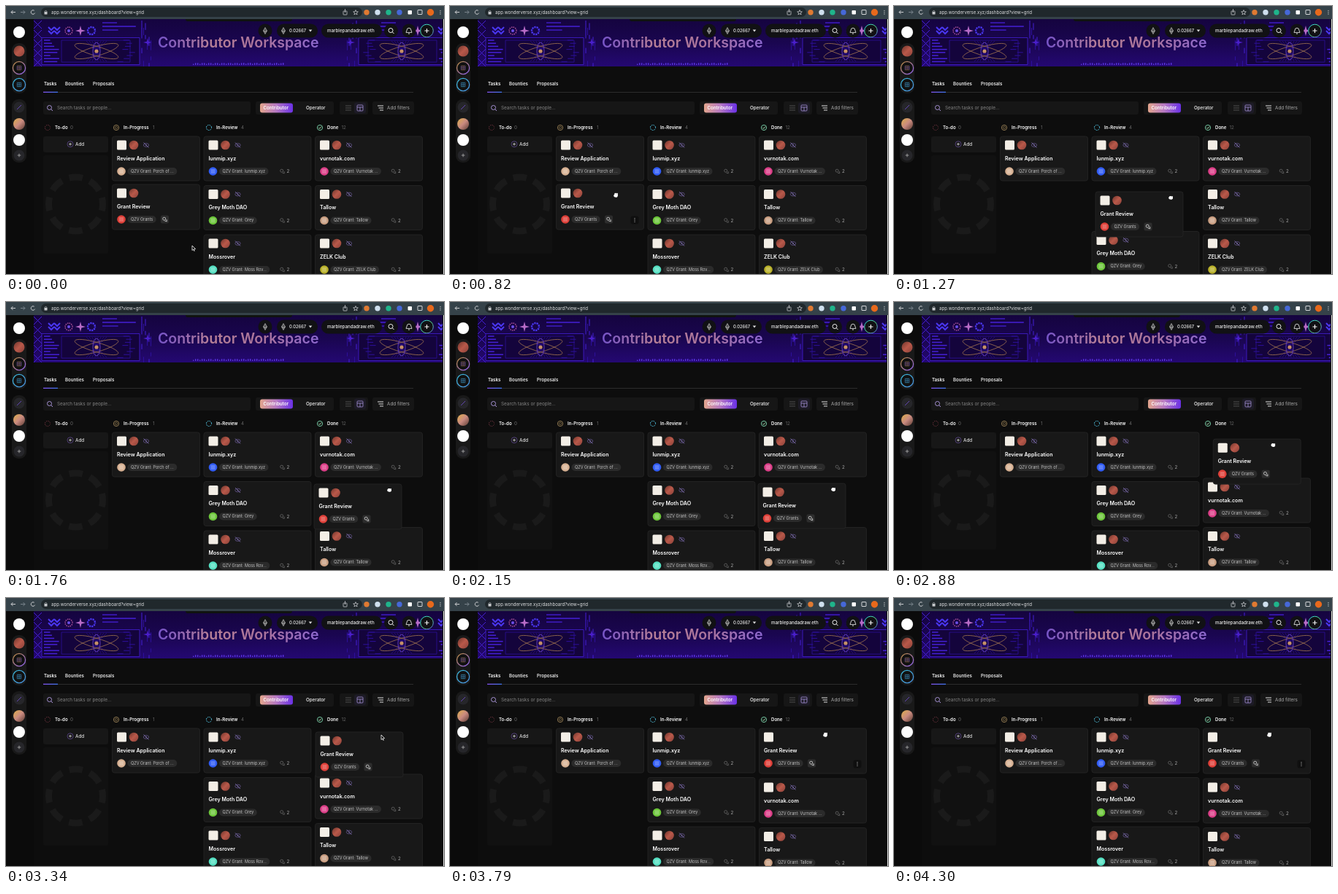
An HTML page with a canvas that plays this animation: 600x368 px, repeating every 4330 ms.

```html
<!DOCTYPE html>
<html lang="en">
<head>
<meta charset="utf-8">
<title>Contributor Workspace</title>
<style>
html, body { margin: 0; width: 100%; height: 100%; overflow: hidden; background: #0d0d0d; }
canvas { display: block; }
</style>
</head>
<body>
<canvas id="stage" width="600" height="368"></canvas>
<script>
const c = document.getElementById('stage').getContext('2d');
const LOOP = 4330, GRAB = 900, RELEASE = 3250, SETTLE = 3450, HOVER = 3600;
const TAU = Math.PI * 2, TOP = 179, PITCH = 67.5, WIDE = 147, NARROW = 120;
const VIOLET = '#4520d6', DIM = '#2d109b';

const rand = i => { const v = Math.sin(i * 12.9898) * 43758.5453; return v - Math.floor(v); };

function paint(fill, stroke, width = 0.8) {
  if (fill) { c.fillStyle = fill; c.fill(); }
  if (stroke) { c.strokeStyle = stroke; c.lineWidth = width; c.stroke(); }
}
function box(x, y, w, h, r, fill, stroke) {
  c.beginPath();
  c.roundRect(x, y, w, h, r);
  paint(fill, stroke);
}
function oval(x, y, rx, ry, fill, stroke, width, tilt = 0) {
  c.beginPath();
  c.ellipse(x, y, rx, ry, tilt, 0, TAU);
  paint(fill, stroke, width);
}
const dot = (x, y, r, fill) => oval(x, y, r, r, fill);
function ring(x, y, r, color, width = 1, dash = []) {
  c.setLineDash(dash);
  c.lineDashOffset = dash.length ? dash[0] / 2 : 0;
  oval(x, y, r, r, null, color, width);
  c.setLineDash([]);
}
// Polyline from a flat list of coordinates, relative to (x, y).
function line(x, y, pts, color, width = 1, fill) {
  c.beginPath();
  for (let i = 0; i < pts.length; i += 2) c.lineTo(x + pts[i], y + pts[i + 1]);
  paint(fill, color, width);
}
const across = (x, y, w, color, width) => line(x, y, [0, 0, w, 0], color, width);
const upright = (x, y, h, color, width) => line(x, y, [0, 0, 0, h], color, width);
const chevron = (x, y, dx, dy, color, width) => line(x, y, [-dx, -dy, 0, 0, dx, -dy], color, width);

function star(x, y, n, outer, inner, fill, stroke) {
  c.beginPath();
  for (let i = 0; i < 2 * n; i++) {
    const r = i % 2 ? inner : outer, a = i * Math.PI / n;
    c.lineTo(x + r * Math.sin(a), y - r * Math.cos(a));
  }
  c.closePath();
  paint(fill, stroke);
}
function text(s, x, y, size, color, weight = 400) {
  c.font = `${weight} ${size}px Inter, sans-serif`;
  c.textBaseline = 'middle';
  c.fillStyle = color;
  c.fillText(s, x, y);
}
function blend(x0, y0, x1, y1, ...colors) {
  const g = c.createLinearGradient(x0, y0, x1, y1);
  colors.forEach((k, i) => g.addColorStop(i / (colors.length - 1), k));
  return g;
}
const around = (x, y, r, ...colors) => blend(x - r, y - r, x + r, y + r, ...colors);

function plus(x, y, r, color) {
  across(x - r, y, 2 * r, color);
  upright(x, y - r, 2 * r, color);
}
function lens(x, y, color) {
  ring(x - 0.5, y - 0.5, 3, color);
  line(x, y, [1.8, 1.8, 4, 4], color);
}
function dots(x, y, color) {
  for (const d of [-2.3, 0, 2.3]) dot(x, y + d, 0.65, color);
}
const portrait = (x, y, r) => dot(x, y, r, around(x, y, r, '#6f352c', '#b9594a', '#8a4139'));

function smooth(t, start, span) {
  const p = Math.min(1, Math.max(0, (t - start) / span));
  return p * p * (3 - 2 * p);
}

function browserBar() {
  const pale = '#c8cacd';
  box(0, 0, 600, 18, 0, '#354249');
  box(48, 2, 440, 13, 6.5, '#20282c');
  for (const [x, dir, color] of [[10, 1, pale], [23, -1, '#77828a']]) {
    across(x - 3, 8.5, 6, color);
    line(x - 3 * dir, 8.5, [2.5 * dir, -2.5, 0, 0, 2.5 * dir, 2.5], color);
  }
  c.beginPath();
  c.arc(37, 8.5, 2.8, 0.4, 5.4);
  paint(null, pale, 1);
  box(52.5, 8, 4, 3.5, 0.5, pale);
  ring(54.5, 7.8, 1.4, pale, 0.7);
  text('app.wonderverse.xyz/dashboard?view=grid', 62, 8.7, 6.1, '#e0e1e3');
  box(462, 7, 5, 5, 0.5, null, pale);
  upright(464.5, 4, 5, pale, 0.8);
  star(479, 9, 5, 3.5, 1.5, null, pale);
  ['#e07a32', '#cfe0ef', '#1fb58b', '#4668d8'].forEach((k, i) => dot(494 + 15 * i, 8.7, 3.7, k));
  box(550.5, 6, 5.5, 5.5, 1, '#fff');
  box(564, 5.5, 6, 6, 0.5, null, '#fff');
  dot(581.5, 8.7, 4.7, '#e8691c');
  dots(595, 8.7, pale);
}

function ornament() {
  for (let i = 0; i < 5; i++) {
    line(38, 20 + 13 * i, [0, 0, 11, 11], VIOLET);
    line(38, 31 + 13 * i, [0, 0, 11, -11], VIOLET);
  }
  for (let i = 0; i < 4; i++) chevron(62 + 8 * (i % 2), 33 + 5 * (i >> 1), 4, 4, '#4a37f0', 2);
  ring(86, 34, 5, '#b5569c', 1.4, [1.5, 1.2]);
  dot(86, 34, 2, '#6b4ee8');
  star(102, 34, 4, 7, 2, '#b86cc8');
  ring(117, 34, 5, '#4a37f0', 2.4, [2.2, 1]);
  star(194, 50, 4, 6, 1.6, '#4b1fc9');

  for (let i = 0; i < 3; i++) across(132, 23 + 5 * i, 20 + 28 * rand(i), VIOLET, 1.3);
  box(49, 43.5, 134, 37, 0, '#14043c', VIOLET);
  box(76, 47, 94, 30, 0, null, DIM);
  for (let i = 0; i < 8; i++) {
    const y = 47 + i * 4.2;
    across(52, y, 6 + 15 * rand(i + 7), VIOLET, 1.5);
    across(172 - 20 * rand(i + 3), y, 8, DIM);
    line(124, 62, [(i - 3.5) * 4, -14, (3.5 - i) * 4, 14], DIM, 0.6);
  }
  for (let i = 0; i < 14; i++) upright(186 + 2.5 * (i % 6), 20 + 60 * rand(i), 4 + 12 * rand(i + 40), i % 2 ? DIM : VIOLET);
  for (const tilt of [-0.28, 0.28]) oval(124, 62, 31, 6.5, null, '#94694f', 0.9, tilt);
  oval(124, 62, 5, 12, null, '#6a43c8', 0.9);
  dot(124, 62, 2.6, '#c59067');
}

function banner() {
  c.save();
  c.beginPath();
  c.rect(38, 18, 560, 65);
  c.clip();
  c.fillStyle = blend(0, 18, 0, 83, '#15043f', '#1a0650', '#240872');
  c.fillRect(38, 18, 560, 65);
  ornament();
  c.save();
  c.translate(666, 0);
  c.scale(-1, 1);
  ornament();
  c.restore();
  for (let i = 0; i < 42; i++) {
    const h = 1.5 + 1.5 * Math.abs(Math.sin(i * 2.1));
    box(256 + 3 * i, 81 - h, 1.4, h, 0, '#5a33e0');
  }
  box(246, 14, 146, 7, 3, '#101310');
  c.restore();
  text('Contributor Workspace', 208, 51.2, 19.5, blend(208, 0, 428, 0, '#7654c9', '#b67f96', '#a9739d', '#8d68cf'), 600);

  const black = '#111114', mid = 34;
  box(371, 24.5, 56, 19, 9.5, black);
  box(432, 24.5, 83, 19, 9.5, black);
  for (const x of [355, 527.5, 552, 576.5]) dot(x, mid, 9.5, black);
  for (const x of [355, 380]) {
    star(x, mid, 2, 4.5, 2.5, '#555', '#aaa');
    chevron(x, mid + 1.5, 2.5, 1.5, '#ddd', 0.6);
  }
  text('0.02667', 388, mid, 5.8, '#eee', 500);
  line(417, 33.5, [-2.3, -1, 2.3, -1, 0, 2], null, 0, '#ddd');
  text('marblepandadraw.eth', 440, mid, 6.2, '#eee', 500);
  lens(527.5, mid, '#eee');
  c.beginPath();
  c.arc(552, mid - 1, 2.8, Math.PI, TAU);
  c.lineTo(556, mid + 2.4);
  c.lineTo(548, mid + 2.4);
  c.closePath();
  paint(null, '#ddd', 0.9);
  across(551, mid + 4, 2, '#ddd');
  ring(576.5, mid, 8.8, around(576.5, mid, 7, '#35d6e8', '#58df9b', '#5d79e2'));
  plus(576.5, mid, 3, '#fff');
}

function ringed(y, from, to) {
  dot(18, y, 8.5, '#111');
  ring(18, y, 8.6, around(18, y, 7, from, to), 1.3);
  for (const d of [-2.7, 0, 2.7]) {
    across(15.3, y + d, 5.4, from, 0.6);
    upright(18 + d, y - 2.7, 5.4, to, 0.6);
  }
}

function sidebar() {
  box(0, 18, 38, 350, 0, '#0b0b0b');
  dot(18, 36, 8, '#fff');
  box(8, 51, 20, 69, 9, '#191919');
  box(8, 128, 20, 87, 9, '#191919');
  portrait(18, 62, 7.5);
  ringed(85, '#b98a4c', '#8f63df');
  ringed(108, '#3bb4d7', '#4890d8');
  dot(18, 139, 7.5, '#26262a');
  line(18, 139, [-3, 3, 3, -3], '#6245b0');
  dot(18, 162, 8, around(18, 162, 8, '#e0b04c', '#c98a80', '#5d3d34'));
  dot(18, 184, 8, '#fff');
  dot(18, 205, 7.5, '#26262a');
  plus(18, 205, 2.3, '#999');
}

function toolbar() {
  const mid = 140, panel = '#161616';
  text('Tasks', 52, 107.5, 6.1, '#fff', 600);
  text('Bounties', 81, 107.5, 6.1, '#eee', 600);
  text('Proposals', 119, 107.5, 6.1, '#eee', 600);
  across(51, 118.5, 507, '#343434', 0.8);
  across(51, 118.3, 20, blend(51, 0, 71, 0, '#8b55ff', '#3f7dff'), 1.2);

  for (const [x, w] of [[51, 284], [342, 107], [457, 39], [502, 57]]) box(x, 131, w, 18, 3, panel);
  lens(60, mid, '#a893d6');
  text('Search tasks or people...', 70, mid, 6.35, '#858585');
  box(348, 133.5, 45, 13, 3, blend(348, 0, 393, 0, '#e3a58d', '#b678c4', '#6a30e6'));
  text('Contributor', 352.5, mid, 6.2, '#fff', 600);
  text('Operator', 411, mid, 6.2, '#ddd', 600);
  for (const d of [-3, 0, 3]) {
    across(465, mid + d, 8, '#555', 0.9);
    across(509 + (d + 3) / 2, mid + d, 8 - (d + 3) / 2, '#ddd');
  }
  box(477, 132.5, 16, 15, 3, '#1d1b26');
  box(481, 136, 8, 8, 1, null, '#a692d8');
  across(481, 139, 8, '#a692d8', 0.8);
  upright(485, 139, 5, '#a692d8', 0.8);
  text('Add filters', 522, mid, 6.35, '#aaa');
}

function heading(x, name, count, countX, color, dash) {
  ring(x, 167, 3.6, color, 1, dash);
  text(name, x + 10, 167.3, 6.1, '#fff', 600);
  text(count, countX, 167.3, 6.2, '#686868');
}

function headings() {
  heading(57, 'To-do', '0', 88, '#8a3d4c', [1.1, 1.4]);
  heading(151, 'In-Progress', '1', 201, '#8f7850');
  ring(151, 167, 1.6, '#8f7850', 0.7);
  heading(278, 'In-Review', '4', 322, '#4cb6d2', [2, 1]);
  heading(430, 'Done', '12', 459.5, '#74c6a1');
  line(430, 167, [-1.7, 0, -0.4, 1.4, 2, -1.4], '#b6f0bf', 0.9);

  box(51, TOP, 89, 22, 3, '#171717');
  ring(88, 189.7, 4, '#5f4a8f', 0.8);
  plus(88, 189.7, 1.9, '#bbb');
  text('Add', 95, 189.8, 6.3, '#ddd', 500);
  box(51, 205, 89, 135, 3, '#111');
  const side = 37 * TAU / 8;
  ring(95.5, 272, 37, '#1a1a1a', 9, [side * 0.64, side * 0.36]);
}

function hiddenEye(x, y) {
  oval(x, y, 3.7, 2.4, null, '#65568f', 0.8);
  dot(x, y, 1, '#65568f');
  line(x, y, [-3.5, -3.5, 3.5, 3.5], '#8374b5', 0.8);
}

function bubble(x, y, color) {
  ring(x - 0.8, y - 0.8, 2, color, 0.8);
  line(x, y, [0, 2.2, 2.8, 2.8, 2.5, 0], color, 0.8);
}

function card(x, y, w, title, tag, color, { h = 61, eye = true, face = true, count, button, menu } = {}) {
  box(x, y, w, h, 3, '#181818', '#262626');
  box(x + 6.5, y + 5.5, 13, 13, 1.5, '#f3eee6');
  if (face) portrait(x + 29.5, y + 12, 6.3);
  if (eye) hiddenEye(x + 46.5, y + 12);
  text(title, x + 6.5, y + 30.5, 7.1, '#fff', 600);

  const row = y + 48;
  dot(x + 12.5, row, 5.8, color);
  for (const d of [-2, 0, 2]) across(x + 9.5, row + d, 6, 'rgba(255,255,255,.55)', 0.8);
  c.font = '400 5.5px Inter, sans-serif';
  box(x + 21, row - 5, c.measureText(tag).width + 9, 10, 5, '#2b2b2b');
  text(tag, x + 25.5, row + 0.2, 5.5, '#c4c4c4');
  if (count) {
    bubble(x + 107.5, row, '#666');
    text(count, x + 113.5, row + 0.2, 6.2, '#aaa');
  }
  if (button) {
    box(x + 66.5, row - 5.5, 11, 11, 2, '#2d2d2d');
    bubble(x + 72, row, '#ddd');
  }
  if (menu) {
    box(x + w - 18, row - 4.5, 11, 11, 3, '#0f0f0f');
    dots(x + w - 12.5, row + 1, '#aaa');
  }
}

const review = [
  ['lunmip.xyz', 'QZV Grant: lunmip.xyz', '#315cf5'],
  ['Grey Moth DAO', 'QZV Grant: Grey', '#6dc63b'],
  ['Mossrover', 'QZV Grant: Moss Rov...', '#55e0c2'],
];
const done = [
  ['vurnotak.com', 'QZV Grant: Vurnotak ...', '#dc3f88'],
  ['Tallow', 'QZV Grant: Tallow', '#c99f83'],
  ['ZELK Club', 'QZV Grant: ZELK Club', '#b9b12a'],
];

// Key points of the pointer: time, x, y.
const stops = [[0, 255, 329], [260, 255, 329], [650, 227, 260], [GRAB, 227, 260], [1270, 379, 263],
  [1760, 525, 258], [2220, 525, 257], [2490, 525, 205], [RELEASE, 514, 188], [LOOP, 514, 188]];

function pointerAt(t) {
  const i = stops.findIndex(s => s[0] > t);
  const [t0, x0, y0] = stops[i - 1], [t1, x1, y1] = stops[i];
  const p = smooth(t, t0, t1 - t0);
  return [x0 + (x1 - x0) * p, y0 + (y1 - y0) * p];
}

// The held card trails the pointer, then drops towards its slot.
function heldAt(t) {
  if (t < GRAB) return [145.5, 245];
  if (t >= SETTLE) return [423.5, TOP];
  const [x, y] = pointerAt(t), drop = smooth(t, RELEASE, 90);
  const lag = 21 * (smooth(t, 1000, 270) - smooth(t, 2220, 270));
  const heldX = x - 82 - lag, heldY = y - 15 + 7 * smooth(t, GRAB, 370);
  return [heldX + (424 - heldX) * drop, heldY + (184 - heldY) * drop];
}

function board(t) {
  const settled = t >= SETTLE;
  card(145.5, TOP, NARROW, 'Review Application', 'QZV Grant: Porch of ...', '#d7b193');

  const reviewGap = 63 * (smooth(t, 1080, 150) - smooth(t, 1450, 150));
  review.forEach((r, i) => card(271, TOP + PITCH * i + (i ? reviewGap : 0), WIDE, ...r, { count: '2' }));
  done.forEach((d, i) => {
    const gap = 63 * (i ? smooth(t, 1560, 150) : smooth(t, 2330, 195)) + (settled ? 6 : 0);
    card(423.5, TOP + PITCH * i + gap, WIDE, ...d, { count: '2' });
  });

  card(...heldAt(t), settled ? WIDE : NARROW, 'Grant Review', 'QZV Grants', '#df4039', {
    h: 62, eye: false, face: !settled, button: true,
    menu: (t > 580 && t < GRAB) || t > HOVER,
  });
}

function pointer(t) {
  const [x, y] = pointerAt(t);
  if (t < 600 || (t >= RELEASE && t < HOVER)) {
    line(x, y, [0, 0, 0, 6.5, 1.5, 5.2, 3, 7.5, 2.6, 4.8, 4.6, 4.6, 0, 0], '#fff', 0.8, '#000');
    return;
  }
  const reach = t >= GRAB && t < RELEASE ? 2 : 3.2;
  for (let i = 0; i < 3; i++) box(x - 1.6 + i * 1.5, y - reach, 1.5, 4, 0.7, '#fff');
  oval(x, y + 0.5, 2.8, 2.2, '#fff', null, 0, 0.3);
}

function draw() {
  const t = performance.now() % LOOP;
  box(0, 0, 600, 368, 0, '#0d0d0d');
  browserBar();
  sidebar();
  banner();
  toolbar();
  headings();
  board(t);
  pointer(t);
  box(599, 18, 1, 350, 0, '#d8d8d8');
  requestAnimationFrame(draw);
}
draw();
</script>
</body>
</html>
```
